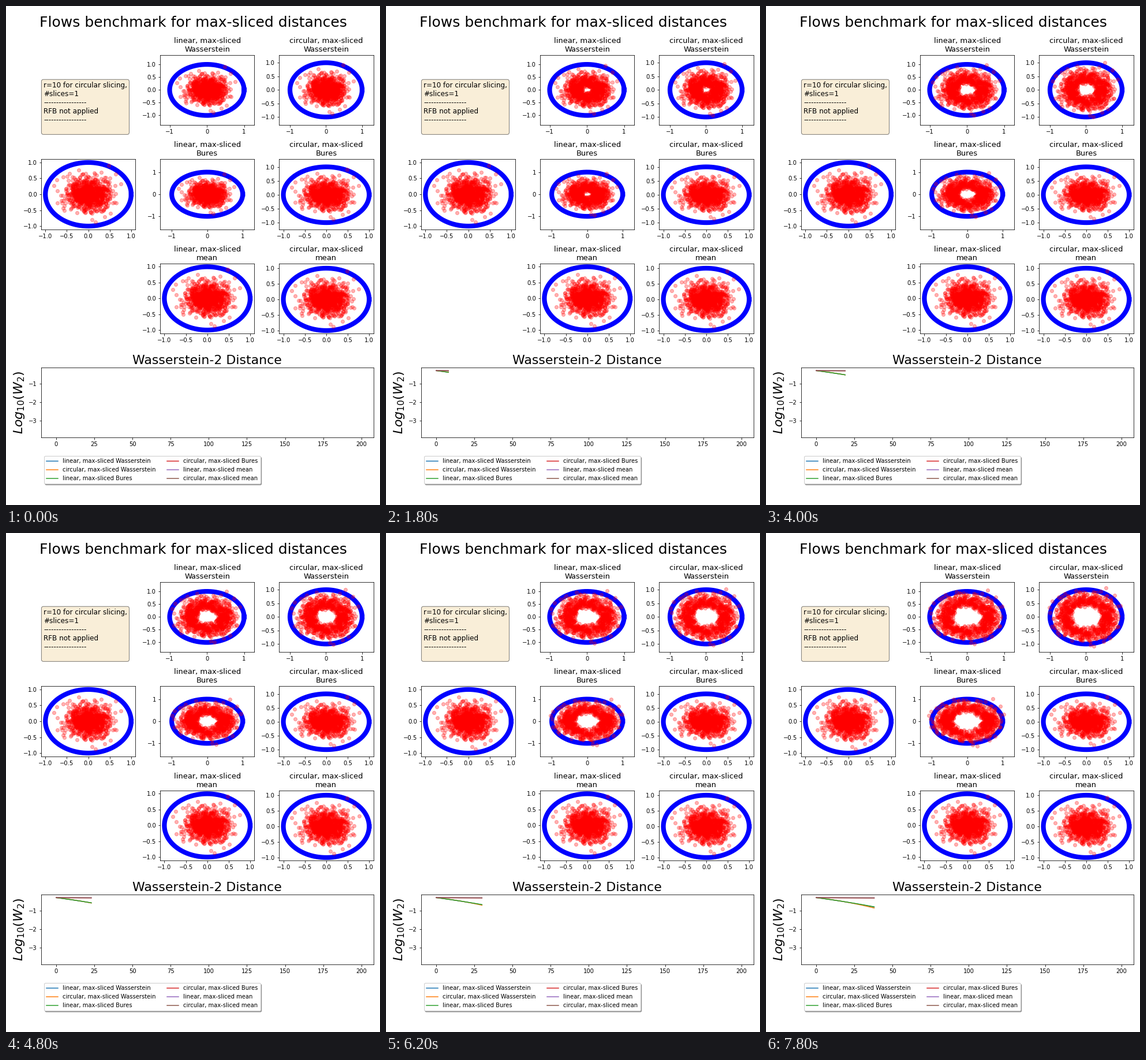
A matplotlib script that plays this animation: 648x864 px, repeating every 8 s.

```python
import numpy as np
import matplotlib.pyplot as plt
from matplotlib.animation import FuncAnimation

W, H = 648, 864
FRAMES, STEP = 40, 200

plt.rcParams["font.family"] = "DejaVu Sans"
fig = plt.figure(figsize=(W / 72, H / 72), dpi=72, facecolor="white")
fig.suptitle("Flows benchmark for max-sliced distances", fontsize=25)


def axes_at(col, row, width=163.5):
    left, top, height = 60.8 + 206.15 * col, 85 + 180.4 * row, 121.2
    return fig.add_axes([left / W, 1 - (top + height) / H, width / W, height / H])


# Starting cloud: a Gaussian core plus a few far-out points
OUTER = np.array([
    (.48, .91), (-.22, .76), (.14, .67), (.30, .69), (.64, .64), (.41, .53),
    (.50, .51), (.76, .33), (.62, .27), (-.73, .45), (-.58, .55), (-.49, .56),
    (-.44, .65), (-.80, .27), (-.72, .11), (-.72, -.27), (-.58, -.44),
    (-.56, -.51), (.09, -.80), (.17, -.87), (.38, -.71), (.52, -.60),
    (.65, -.27), (.64, .02)])
rng = np.random.default_rng(4)
core = rng.normal(0, .245, (1000, 2))
core = core[np.hypot(*core.T) < .68]
cloud = np.vstack([core, OUTER])
radius = np.hypot(*cloud.T)
angle = np.arctan2(cloud[:, 1], cloud[:, 0])
jitter = rng.normal(0, .05, len(cloud))


def spread(lobes, phase, depth, rate=.0125, damp=.35, part=0):
    """Push the cloud outwards to open a hole; part drives it to both sides."""
    wobble = 1 + depth * np.cos(lobes * angle + phase) + jitter
    reach = (1 - .2 * radius - damp * radius ** 2) * wobble

    def at(k):
        p = 1 - np.exp(-rate * k)
        r = radius + p * reach
        a = angle - part * p * np.sin(2 * angle)
        return np.column_stack([r * np.cos(a), r * np.sin(a)])
    return at


def stretch(sx, sy):
    return lambda k: cloud * (1 + sx * k, 1 + sy * k)


HALF = [-1, -.5, 0, .5, 1]
UNIT = [-1, 0, 1]
FULL = (-1.1, 1.1)


def panel(col, row, title, xlim, ylim, xticks, yticks, flow):
    ax = axes_at(col, row)
    t = np.linspace(0, 2 * np.pi, 400)
    ax.plot(np.cos(t), np.sin(t), color="blue", lw=8.2, zorder=1)
    dots = ax.scatter(*cloud.T, color="red", alpha=.3, zorder=2)
    ax.set(xlim=xlim, ylim=ylim, xticks=xticks, yticks=yticks)
    ax.set_title(title, fontsize=13)
    return dots, flow


panels = [
    panel(0, 1, "", FULL, FULL, HALF, HALF, stretch(0, 0)),
    panel(1, 0, "linear, max-sliced\nWasserstein", (-1.257, 1.278),
          (-1.378, 1.364), UNIT, HALF, spread(3, 1, .07, .0118)),
    panel(2, 0, "circular, max-sliced\nWasserstein", (-1.302, 1.314),
          (-1.298, 1.281), UNIT, HALF, spread(4, 2, .04)),
    panel(1, 1, "linear, max-sliced\nBures", (-1.328, 1.331),
          (-1.585, 1.58), UNIT, UNIT, spread(4, 0, .06, .0125, .22, .4)),
    panel(2, 1, "circular, max-sliced\nBures", FULL, (-1.239, 1.272),
          HALF, HALF, stretch(.0006, -.0008)),
    panel(1, 2, "linear, max-sliced\nmean", FULL, (-1.108, 1.104),
          HALF, HALF, stretch(0, 0)),
    panel(2, 2, "circular, max-sliced\nmean", FULL, (-1.093, 1.152),
          HALF, HALF, stretch(.0002, .0002)),
]

dashes = "-" * 17
fig.text(65 / W, 1 - 130.8 / H,
         f"r=10 for circular slicing,\n#slices=1\n{dashes}\nRFB not applied\n{dashes}\n",
         fontsize=12, va="top",
         bbox=dict(boxstyle="round", facecolor="wheat", alpha=.5))

# Distance chart: label, then linear and quadratic fall per step
CURVES = [
    ("linear, max-sliced Wasserstein", .0108, .00007),
    ("circular, max-sliced Wasserstein", .0095, .00014),
    ("linear, max-sliced Bures", .0108, .00006),
    ("circular, max-sliced Bures", .0006, 0),
    ("linear, max-sliced mean", .0002, 0),
    ("circular, max-sliced mean", .0004, 0),
]
chart = axes_at(0, 3, 575.8)
chart.set(xlim=(-9.9, 207.9), ylim=(-3.906, -.12),
          xticks=range(0, 201, 25), yticks=[-3, -2, -1])
chart.set_title("Wasserstein-2 Distance", fontsize=22)
chart.set_ylabel("$Log_{10}(W_2)$", fontsize=22)
lines = [chart.plot([], [], label=name)[0] for name, *_ in CURVES]
chart.legend(loc="upper left", bbox_to_anchor=(65.8 / W, 1 - 779.2 / H),
             bbox_transform=fig.transFigure, borderaxespad=0,
             ncol=2, fontsize=10, fancybox=True, shadow=True)


def draw(k):
    for dots, flow in panels:
        dots.set_offsets(flow(k))
    t = np.arange(k)
    for line, (_, a, b) in zip(lines, CURVES):
        line.set_data(t, -.28 - a * t - b * t ** 2)
    return [dots for dots, _ in panels] + lines


anim = FuncAnimation(fig, draw, frames=FRAMES, interval=STEP, blit=False)
plt.show()
```
